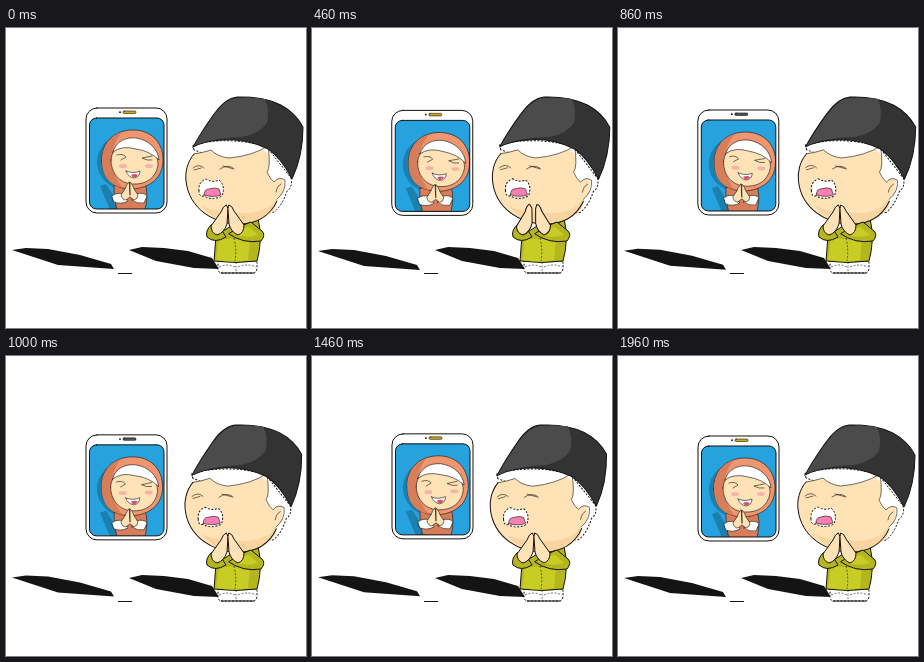
An HTML page that plays this animation: 300 by 300 pixels, repeating every 2.42 s.

```html
<!DOCTYPE html>
<html lang="en">
<head>
<meta charset="utf-8">
<title>Greeting by phone</title>
<style>
html, body { margin: 0; width: 100%; height: 100%; overflow: hidden; background: #fff; }
svg { display: block; width: 100vw; height: 100vh; }
.ink { stroke: #14110e; stroke-width: 1; stroke-linejoin: round; stroke-linecap: round; }
.thin { stroke-width: .6; }
.line { fill: none; }
.dots { stroke-dasharray: 2 1.6; stroke-linecap: butt; }
.white { fill: #fff; }
.skin { fill: #ffe2b6; }
.shade { fill: #f8d5a0; }
.shirt { fill: #b3b71d; }
.bright { fill: #c9cc24; }
.scarf { fill: #f0966f; }
.scarf-dark { fill: #d87d5a; }
</style>
</head>
<body>
<svg viewBox="0 0 300 300">
  <defs>
    <clipPath id="screen"><rect x="83.500" y="90" width="74.500" height="91" rx="7"/></clipPath>
    <clipPath id="face"><path d="M180 152C179 128 194 114 222 113C248 112 270 124 277 150C280 178 260 195 233 196C206 196 182 180 180 152Z"/></clipPath>
  </defs>

  <g fill="#141414">
    <path id="phoneShade" d="M6 222L20 220L42 221L74 227L105 236L108 241L80 239L52 237Z"/>
    <path d="M123 222L136 219L158 220L182 223L206 230L213 241L188 240L150 233Z"/>
    <path d="M112 245h14v1h-14z"/>
  </g>

  <g id="phone">
    <rect class="ink white" x="80" y="80" width="81" height="105" rx="11"/>
    <rect id="speaker" class="ink thin" x="117" y="83" width="13" height="2.500" rx="1.200"/>
    <circle cx="114" cy="84.200" r=".9"/>
    <g clip-path="url(#screen)">
      <rect x="83" y="89" width="76" height="93" fill="#26a3df"/>
      <ellipse cx="120" cy="134" rx="29" ry="28" fill="#1c7fae"/>
      <path d="M100 156L117 182H104L94 158Z" fill="#1c7fae"/>
      <path class="ink thin scarf-dark" d="M108 158Q108 172 111 182H139Q143 167 139 155Z"/>
      <g id="girl">
        <path class="ink thin scarf" d="M96 133C95 114 109 102 127 102C145 102 157 114 157 132C157 150 144 160 126 161C108 161 96 151 96 133Z"/>
        <path class="scarf-dark" d="M96 133C96 118 104 108 116 104C104 118 101 141 117 160C103 157 96 148 96 133Z"/>
        <path class="ink thin skin" d="M105 132C106 119 116 112 128 113C143 115 152 124 152 137C150 150 140 157 126 156C113 155 105 145 105 132Z"/>
        <path class="ink thin white" d="M107 124C110 113 120 109 130 110C143 112 152 121 153 132Q144 123 130 121Q116 117 107 124Z"/>
        <g fill="#f9b3a6"><ellipse cx="117" cy="138" rx="4" ry="2"/><ellipse cx="143" cy="138" rx="4" ry="2"/></g>
        <path class="ink thin line" d="M111 127Q117 125 120 129L115 132M146 128L136 130Q141 133 146 132"/>
        <path class="ink thin" d="M120 143Q127 146 134 143Q134 149 128 150Q122 149 120 143Z" fill="#fff"/>
        <path d="M125 147Q129 145 132 147Q130 150 127 149.500Z" fill="#d84f72"/>
      </g>
      <path class="ink thin white" d="M106 168Q110 164 118 166L122 173Q115 177 108 174ZM126 172L130 166Q138 164 141 168L138 175Q131 176 126 172Z"/>
      <path class="ink thin skin" d="M123 154Q120 157 119 161L115 167Q116 172 120 172L124 169L128 172Q132 171 132 167L128 161Q127 157 124 154L124 167Z"/>
    </g>
    <rect class="ink line" x="83.500" y="90" width="74.500" height="91" rx="7"/>
  </g>

  <path class="ink white dots" d="M212 233H251V241Q250 245 247 245H215Q212 244 212 241Z"/>
  <path class="ink line" d="M215 245H248"/>
  <path class="ink line thin dots" d="M230 234V244M213 239Q222 235 229 239M232 239Q241 235 250 239"/>

  <path class="ink shirt" d="M210 208L208 233Q230 236 251 233Q257 212 252 190L230 195Z"/>
  <path class="bright" d="M213 211L210 232Q228 235 242 232L244 211Z"/>
  <path class="ink line thin dots" d="M228 210Q231 222 229 233"/>

  <g id="head">
    <path class="ink white dots" d="M188 122L187 117Q220 108 260 118L285 150Q287 159 281 163Q276 178 268 184Q240 190 230 170L210 130Z"/>
    <g clip-path="url(#face)">
      <path class="skin" d="M176 125Q192 126 205 122Q212 129 223 130Q246 128 262 118Q265 139 261 144Q264 151 268 154Q273 148 279 152Q280 164 271 171Q272 190 245 200H176Z"/>
      <path class="shade" d="M270 171Q262 184 240 185Q214 186 196 178Q212 198 240 197Q270 194 271 171Z"/>
    </g>
    <path class="ink line" d="M188 126C181 134 179 145 180 153C183 181 208 196 233 196C251 196 264 188 271 173"/>
    <path class="ink line thin" d="M188 126Q196 125 205 122Q212 129 223 130Q246 128 262 118Q265 139 261 144Q264 151 268 154Q273 148 279 152Q280 164 271 171M270 164Q271 158 275 156"/>
    <path class="ink" d="M187 119Q195 104 208 86Q219 70 231 69Q257 68 275 77Q290 85 297 99Q297 128 286 151Q275 130 262 121Q240 110 215 112Q198 113 187 119Z" fill="#333"/>
    <path d="M188 118Q196 104 209 86Q220 71 231 70Q246 69 259 71Q264 82 261 95Q253 106 236 109Q205 110 188 118Z" fill="#4b4b4b"/>
    <path class="ink line thin" d="M187 140Q193 135 198 140M188 142L195 140M214 141Q221 136 227 140M217 138L228 141"/>
    <path class="ink white dots" d="M193 163Q192 154 200 151Q207 155 213 152Q220 158 216 168Q206 173 198 168Q193 169 193 163Z"/>
    <path class="ink thin" d="M198 167Q198 161 203 161Q208 159 213 161L215 167Q207 170 198 167Z" fill="#fb7fb0"/>
  </g>

  <path class="ink shirt" d="M205 197Q199 203 201 209Q209 216 220 209L215 201Z"/>
  <path class="ink shirt" d="M223 206Q237 216 255 213Q260 207 256 203L245 194L235 198Z"/>
  <path class="bright" d="M227 206Q240 211 252 207L243 199L235 200Z"/>
  <path id="handL" class="ink skin" d="M220 177Q217 178 215 184L205 198Q205 205 211 207Q218 205 221 196L222 181Z"/>
  <path id="handR" class="ink skin" d="M223 177Q226 177 228 183L238 197Q238 205 232 207Q225 204 223 196L222 181Z"/>
</svg>
<script>
const LOOP = 2420, STEP = 20;
const part = id => document.getElementById(id);
const place = (id, transform) => part(id).setAttribute("transform", transform);

const progress = (t, from, to) => Math.min(1, Math.max(0, (t - from) / (to - from)));
const smooth = p => p * p * (3 - 2 * p);

function draw(t) {
  // One eased swing: forward and down, then back and up, then rest.
  const swing = Math.sin(2 * Math.PI * smooth(progress(t, 140, 1760)));
  const lean = swing > 0 ? swing * 0.3 : swing;
  const spread = Math.sin(Math.PI * progress(t, 320, 860)) ** 2;

  place("phone", `translate(${-0.4 * Math.max(0, swing)} ${4 * swing})`);
  place("phoneShade", `translate(0 ${1.5 * swing})`);
  place("girl", `rotate(${3 * swing} 125 160)`);
  place("head", `translate(${1.6 * lean} 0) rotate(${1.8 * lean} 235 195)`);
  place("handL", `rotate(${-9 * spread} 210 206)`);
  place("handR", `rotate(${7 * spread} 232 206)`);
  part("speaker").setAttribute("fill", t > 500 && t < 1400 ? "#555" : "#d4a81c");
}

const start = performance.now();
function tick(now) {
  const t = Math.max(0, now - start) % LOOP;
  draw(Math.floor(t / STEP) * STEP);
  requestAnimationFrame(tick);
}
draw(0);
requestAnimationFrame(tick);
</script>
</body>
</html>
```
